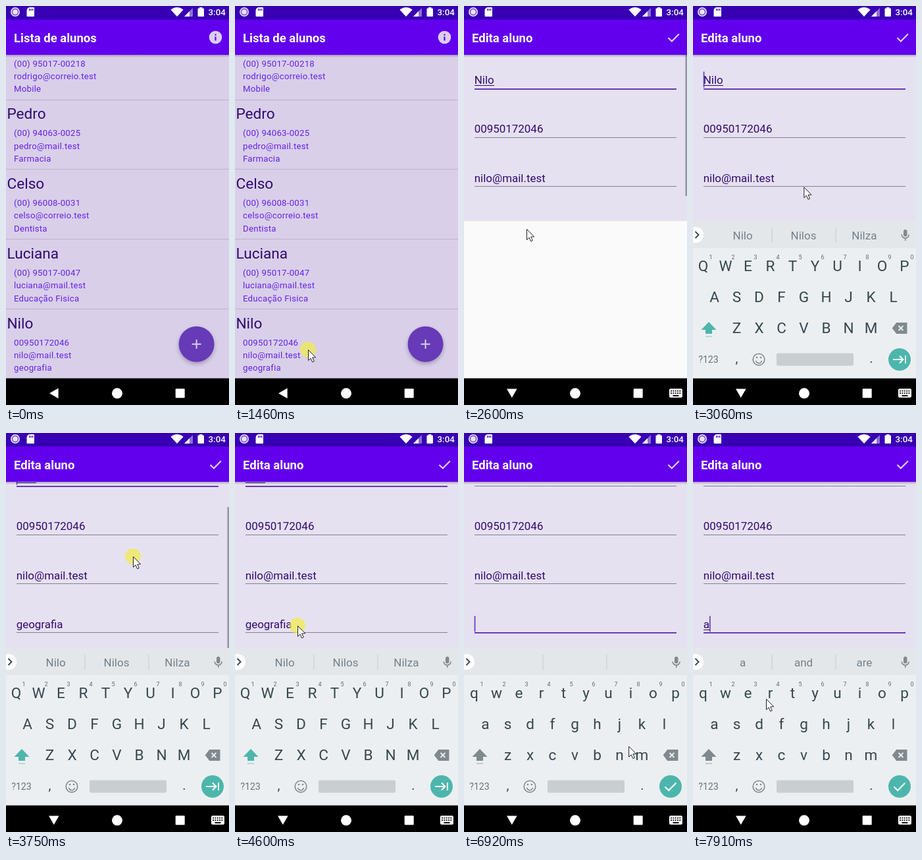
Write an HTML page with a canvas that moves like this. It is 339x605 px and loops after 7.99 s.

```html
<!DOCTYPE html>
<html lang="pt">
<head>
<meta charset="utf-8">
<title>Lista de alunos</title>
<style>
  html, body { margin: 0; width: 100%; height: 100%; overflow: hidden; background: #000; }
  canvas { display: block; }
</style>
</head>
<body>
<canvas id="stage" width="339" height="605"></canvas>
<script>
const W = 339, H = 605, LOOP = 7990, TICK = 76.8;
const BAR = 20.5, TOP = 74, NAV = 564.5, KEYS = 326;
const screenCtx = document.getElementById('stage').getContext('2d');
const layer = document.createElement('canvas');
layer.width = W;
layer.height = H;
const layerCtx = layer.getContext('2d');
let c = screenCtx;

const PURPLE = '#6200ee', DARK = '#3700b3', ACCENT = '#673ab7', INK = '#2f0b70';
const LILAC = '#d9cfe9', TEAL = '#4db6ac', KEY = '#37474f', GRAY = '#80898e', PALE = '#eceff1';

const student = (name, phone, host, course) =>
  ({ name, phone, mail: `${name.toLowerCase()}@${host}`, course });
const students = [
  student('Rodrigo', '(00) 95017-00218', 'correio.test', 'Mobile'),
  student('Pedro', '(00) 94063-0025', 'mail.test', 'Farmacia'),
  student('Celso', '(00) 96008-0031', 'correio.test', 'Dentista'),
  student('Luciana', '(00) 95017-0047', 'mail.test', 'Educação Fisica'),
  student('Nilo', '00950172046', 'mail.test', 'geografia')
];
const edited = students[4];

const clamp = v => Math.max(0, Math.min(1, v));
const ramp = (n, a, b) => clamp((n - a) / (b - a));
const mix = (a, b, p) => a + (b - a) * p;
const shown = (n, a, b) => Math.min(ramp(n, a - 1, a), 1 - ramp(n, b - 3, b));

// Pointer legs, in ticks; a leg with "release" presses from arrival until then
const legs = [
  { leave: 0, arrive: 12, x: 111, y: 521, release: 15 },
  { leave: 24, arrive: 28, x: 95, y: 338 },
  { leave: 28, arrive: 37, x: 194, y: 252, release: 46 },
  { leave: 37, arrive: 43, x: 193, y: 187 },
  { leave: 46, arrive: 54, x: 95, y: 292, release: 56 },
  { leave: 57, arrive: 66, x: 313, y: 484, release: 81 },
  { leave: 81, arrive: 91, x: 22, y: 441, release: 94 },
  { leave: 94, arrive: 97, x: 111, y: 403 }
];

function rect(x, y, w, h, color) {
  c.fillStyle = color;
  c.fillRect(x, y, w, h);
}
function pill(x, y, w, h, r, color) {
  c.fillStyle = color;
  c.beginPath();
  c.roundRect(x, y, w, h, r);
  c.fill();
}
function disc(x, y, r, color) {
  c.fillStyle = color;
  c.beginPath();
  c.arc(x, y, r, 0, Math.PI * 2);
  c.fill();
}
function arc(x, y, r, from, to, color) {
  c.strokeStyle = color;
  c.lineWidth = 1.6;
  c.beginPath();
  c.arc(x, y, r, from, to);
  c.stroke();
}
function line(color, width, ...points) {
  c.strokeStyle = color;
  c.lineWidth = width;
  c.beginPath();
  points.forEach(([x, y]) => c.lineTo(x, y));
  c.stroke();
}
// Isosceles triangle around (x, y), pointing up before rotation
function triangle(x, y, halfBase, halfHeight, color, turn = 0) {
  c.save();
  c.translate(x, y);
  c.rotate(turn * Math.PI / 2);
  c.fillStyle = color;
  c.beginPath();
  c.moveTo(0, -halfHeight);
  c.lineTo(halfBase, halfHeight);
  c.lineTo(-halfBase, halfHeight);
  c.fill();
  c.restore();
}
function chevron(x, y, s, color) {
  line(color, 1.9, [x - s, y - s], [x, y], [x - s, y + s]);
}
function check(x, y, s, color) {
  line(color, 2.1, [x - s, y], [x - s / 3, y + s * 0.65], [x + s, y - s * 0.7]);
}
function text(s, x, y, size, color, { align = 'left', weight = 400, spacing = 0 } = {}) {
  c.font = `${weight} ${size}px Roboto, sans-serif`;
  c.letterSpacing = spacing + 'px';
  c.textAlign = align;
  c.fillStyle = color;
  c.fillText(s, x, y);
  return c.measureText(s).width;
}
function clipped(y, h, draw) {
  c.save();
  c.beginPath();
  c.rect(0, y, W, h);
  c.clip();
  draw();
  c.restore();
}

function header(title) {
  const shade = c.createLinearGradient(0, TOP, 0, TOP + 4);
  shade.addColorStop(0, 'rgba(40,20,80,.3)');
  shade.addColorStop(1, 'rgba(40,20,80,0)');
  rect(0, TOP, W, 4, shade);
  rect(0, 0, W, TOP, PURPLE);
  rect(0, 0, W, BAR, DARK);
  text(title, 12, 55, 18.5, '#fff', { weight: 700 });
}

function listScreen() {
  rect(0, 0, W, H, '#000');
  rect(0, 0, W, NAV, LILAC);
  clipped(TOP, NAV - TOP, () => students.forEach(({ name, phone, mail, course }, i) => {
    const y = 35.8 + i * 105.8;
    rect(0, Math.round(y), W, 1, '#bcb2cb');
    text(name, 1.5, y + 29.8, 22.6, INK);
    [phone, mail, course].forEach((row, j) =>
      text(row, 12, y + 55.7 + j * 19.3, 13.2, '#6422e6', { spacing: 0.25 }));
  }));
  c.save();
  c.shadowColor = 'rgba(30,10,60,.3)';
  c.shadowBlur = 6;
  c.shadowOffsetY = 3;
  disc(289.6, 512.7, 27, ACCENT);
  c.restore();
  rect(282.6, 511.7, 14, 2, LILAC);
  rect(288.6, 505.7, 2, 14, LILAC);
  header('Lista de alunos');
  disc(318.5, 47.5, 9.8, '#dccff2');
  rect(317.4, 46.5, 2.2, 6, PURPLE);
  rect(317.4, 42.5, 2.2, 2.2, PURPLE);
}

function courseText(n) {
  if (n >= 93) return 'a';
  const full = edited.course.length;
  return edited.course.slice(0, full - Math.round(ramp(n, 71, 78) * full));
}

function formScreen(n) {
  const bottom = n >= 27 ? KEYS : NAV;
  const scroll = 45 * ramp(n, 37, 43);
  const focus = n < 55 ? 0 : 3;
  const deleting = n >= 72 && n < 81;
  const caretOn = deleting || Math.floor((n - 17) / 6.5) % 2 === 0;
  const values = [edited.name, edited.phone, edited.mail, courseText(n)];

  rect(0, 0, W, H, '#000');
  rect(0, 0, W, NAV, '#fafafa');
  clipped(TOP, bottom - TOP, () => {
    rect(0, TOP, W, 297 - scroll, '#e6e1f0');
    values.forEach((value, i) => {
      const y = 118 + i * 74.3 - scroll;
      const focused = i === focus;
      const width = text(value, 15.7, y, 16.95, INK);
      rect(16, Math.round(y + 6.5), 307, focused ? 2 : 1, focused ? ACCENT : '#85808f');
      if (!focused) return;
      if (n >= 24 && value) rect(16, Math.round(y + 2), width, 1, INK);
      const caretX = 15.7 + (i === 3 ? width : 0);
      if (caretOn) rect(caretX, y - 18.5, 1.7, 24, ACCENT);
      if (i === 3 && n < 72) {
        disc(caretX + 0.6, y + 18.3, 9.5, ACCENT);
        triangle(caretX + 0.6, y + 10, 6, 3, ACCENT);
      }
    });
    const bar = shown(n, 27, 34) + shown(n, 37, 52);
    rect(336.5, TOP + scroll * 0.85, 2.5, 214, `rgba(110,105,125,${0.65 * bar})`);
  });
  header('Edita aluno');
  check(318.7, 48.2, 8.2, '#e0d3fa');
}

function suggestions(n) {
  if (n < 58) return ['Nilo', 'Nilos', 'Nilza'];
  if (n < 82) return ['geografia', 'geografi', 'geografi and'];
  return n < 93 ? [] : ['a', 'and', 'are'];
}

function suggestionStrip(n) {
  rect(0, KEYS, W, 41, '#e4e7e9');
  suggestions(n).forEach((word, i) => {
    const size = word.length > 10 ? 13.3 : 17;
    text(word, 168 + (i - 1) * 92.4, 353.5, size, '#74808a', { align: 'center' });
  });
  [-1, 1].forEach(side => rect(168 + side * 48.5, 336, 1, 23, '#c9ced1'));
  disc(4, 347, 12, '#fff');
  chevron(8.5, 347, 5, KEY);
  pill(320, 339, 5.5, 10.5, 2.7, GRAY);
  arc(322.7, 346.5, 5.5, 0, Math.PI, GRAY);
  rect(322, 352, 1.5, 4, GRAY);
}

function letterKeys(upper) {
  ['qwertyuiop', 'asdfghjkl', 'zxcvbnm'].forEach((keys, row) => [...keys].forEach((key, i) => {
    const x = 168.5 + (i - (keys.length - 1) / 2) * 34;
    text(upper ? key.toUpperCase() : key, x, 401.5 + row * 47.4, 22.6, KEY, { align: 'center' });
    if (row === 0) text((i + 1) % 10, x + 11.5, 384, 9, '#5d6b73', { align: 'center' });
  }));
}

function keyboard(n) {
  const upper = n < 58;
  const center = { align: 'center' };
  const shift = upper ? TEAL : GRAY;
  c.save();
  c.translate(0, mix(NAV - KEYS, 0, ramp(n, 28, 33)));
  rect(0, KEYS, W, NAV - KEYS, PALE);
  suggestionStrip(n);
  if (n >= 67 && n < 81) pill(291, 469, 46, 38, 2, '#dbdfe1');
  letterKeys(upper);

  triangle(24, 485, 11.5, 6, shift);
  rect(19, 490, 10, 7, shift);
  rect(19, 500.5, 10, 1.5, upper ? '#a5d6d0' : '#b5bcc0');

  triangle(306, 488.5, 8.5, 3.3, GRAY, 3);
  rect(309, 480, 16.5, 17, GRAY);
  [-1, 1].forEach(k => line(PALE, 1.8, [312.5, 488.5 - 3.5 * k], [319.5, 488.5 + 3.5 * k]));

  text('?123', 23.5, 541, 14.2, '#65737b', center);
  text(',', 66.5, 541, 20, KEY, center);
  text('.', 271, 541, 20, KEY, center);
  arc(100, 536, 8.8, 0, Math.PI * 2, GRAY);
  arc(100, 537, 4.6, 0.2, Math.PI - 0.2, GRAY);
  [-3, 3].forEach(dx => disc(100 + dx, 533, 1.3, GRAY));
  pill(127, 526.5, 117, 19, 2, '#c9ced1');

  disc(314, 536, 17, TEAL);
  if (upper) {
    rect(304, 535, 15, 2, '#fff');
    chevron(319.5, 536, 5.5, '#fff');
    rect(322, 530, 2, 12, '#fff');
  } else {
    check(314, 536.5, 8.5, '#fff');
  }
  c.restore();
}

function statusIcons() {
  ['#e9e2f6', '#7a52c8', '#e9e2f6'].forEach((color, i) => disc(14, 9, 7 - i * 1.6, color));
  pill(31.5, 2, 11.5, 14, [5, 1, 1, 1], '#fff');
  for (let i = 0; i < 3; i++) rect(35 + i * 2.5, 4, 1.3, 3, DARK);
  c.fillStyle = '#fff';
  c.beginPath();
  c.moveTo(260, 16);
  c.arc(260, 16, 14, -Math.PI * 0.74, -Math.PI * 0.26);
  c.fill();
  for (const [size, color] of [[13, '#8f70d2'], [8, '#fff']]) {
    c.fillStyle = color;
    c.beginPath();
    c.moveTo(271, 16);
    c.lineTo(271 + size, 16 - size);
    c.lineTo(271 + size, 16);
    c.fill();
  }
  pill(291.5, 3.5, 9.5, 12.5, 1, '#fff');
  rect(294, 2, 4.5, 2, '#fff');
  text('3:04', 307.5, 14, 13.4, '#fff', { weight: 500 });
}

function navIcons(n) {
  const y = 587.3;
  const typing = n >= 24;
  triangle(72.8, y, 7.8, 6.8, '#fff', typing ? 2 : 3);
  disc(169, y, 8, '#fff');
  pill(257.7, y - 7, 14, 14, 1, '#fff');
  if (!typing) return;
  pill(312, y - 7, 20, 13.5, 2, '#fff');
  for (let i = 0; i < 10; i++) rect(314.2 + (i % 5) * 3.3, y - 4.5 + (i < 5 ? 0 : 3.3), 1.8, 1.8, '#000');
  rect(317.5, y + 2.7, 9, 1.8, '#000');
}

function pointer(n) {
  if (n < 0) return;
  let x = 331, y = 594;
  for (const leg of legs) {
    const p = ramp(n, leg.leave, leg.arrive);
    const eased = p * p * (3 - 2 * p);
    x = mix(x, leg.x, eased);
    y = mix(y, leg.y, eased);
  }
  if (legs.some(leg => n >= leg.arrive && n < leg.release)) disc(x, y, 12, 'rgba(241,236,70,.7)');
  c.save();
  c.translate(x + 0.5, y + 0.5);
  const arrow = new Path2D('M0 0V16L3.6 12.6 6.2 18.4 8.8 17.2 6.2 11.6 11.2 11.4Z');
  c.fillStyle = '#fff';
  c.fill(arrow);
  c.strokeStyle = '#22202c';
  c.lineWidth = 1;
  c.stroke(arrow);
  c.restore();
}

function render(time) {
  const n = Math.floor((time - 446) / TICK);
  c = screenCtx;
  if (n < 22) listScreen();
  if (n >= 15) {
    const p = ramp(n, 14, 22);
    c = layerCtx;
    formScreen(n);
    if (n >= 29) clipped(KEYS, NAV - KEYS, () => keyboard(n));
    c = screenCtx;
    c.globalAlpha = p ** 0.8;
    c.drawImage(layer, 0, Math.round(48 * (1 - p) ** 0.7));
    c.globalAlpha = 1;
  }
  statusIcons();
  navIcons(n);
  pointer(n);
}

function loop() {
  render(performance.now() % LOOP);
  requestAnimationFrame(loop);
}
loop();
</script>
</body>
</html>
```
